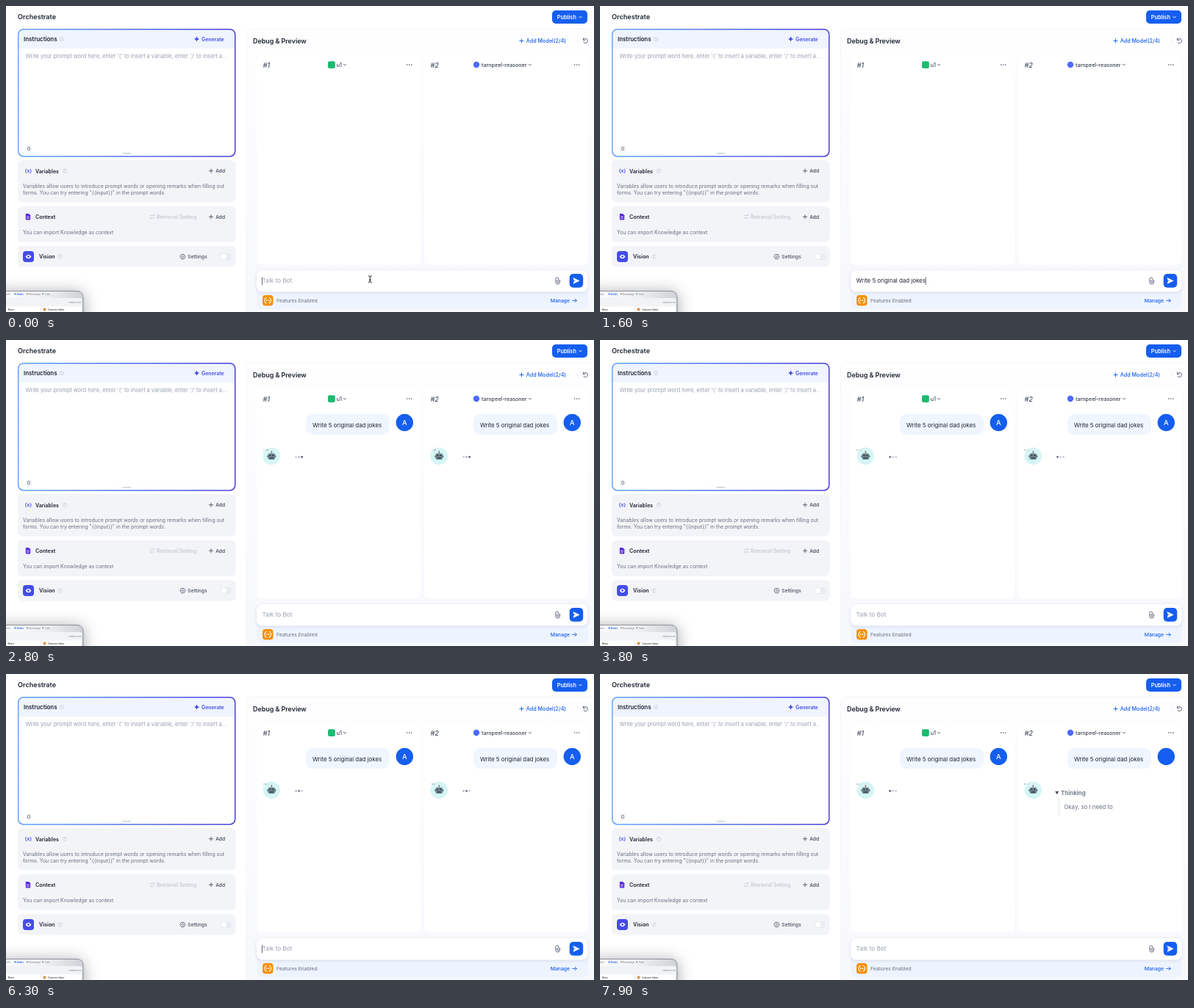
Animation, 800 px wide and 417 px high, one loop 8000 ms. Source, as an HTML page with a canvas:

```html
<!DOCTYPE html>
<html lang="en">
<head>
<meta charset="utf-8">
<title>Prompt debugging</title>
<style>
html, body { margin: 0; width: 100%; height: 100%; overflow: hidden; background: #fff; }
canvas { display: block; width: 800px; height: 417px; }
</style>
</head>
<body>
<canvas id="stage"></canvas>
<script>
const LOOP = 8000, W = 800, H = 417;
const PASTE = 1600, SEND = 1900, AVATAR = 2300, THINK = 7700;
const BLUE = '#155eef', INDIGO = '#444ce7', INK = '#1d2433', BODY = '#676f83', MUTED = '#98a0b0';
const PROMPT = 'Write 5 original dad jokes';
const COL = 228;

const canvas = document.getElementById('stage');
const c = canvas.getContext('2d');
const dpr = window.devicePixelRatio || 1;
canvas.width = W * dpr;
canvas.height = H * dpr;

function text(s, x, y, size, color, weight = 400, style = '') {
  c.font = `${style} ${weight} ${size}px Inter, "Liberation Sans", sans-serif`;
  c.fillStyle = color;
  c.fillText(s, x, y);
}

function box(x, y, w, h, r, fill, stroke, lw = 1) {
  c.beginPath();
  c.roundRect(x, y, w, h, r);
  if (fill) { c.fillStyle = fill; c.fill(); }
  if (stroke) { c.strokeStyle = stroke; c.lineWidth = lw; c.stroke(); }
}

function disc(x, y, r, fill) {
  c.beginPath();
  c.arc(x, y, r, 0, 7);
  c.fillStyle = fill;
  c.fill();
}

function ring(x, y, r, color, lw = 0.8, from = 0, to = Math.PI * 2) {
  c.beginPath();
  c.arc(x, y, r, from, to);
  c.strokeStyle = color;
  c.lineWidth = lw;
  c.stroke();
}

function path(d, x, y, stroke, lw = 1, fill) {
  const p = new Path2D(d);
  c.save();
  c.translate(x, y);
  c.lineCap = c.lineJoin = 'round';
  if (fill) { c.fillStyle = fill; c.fill(p); }
  if (stroke) { c.strokeStyle = stroke; c.lineWidth = lw; c.stroke(p); }
  c.restore();
}

function shadow(color, blur, dy = 0) {
  c.shadowColor = color;
  c.shadowBlur = blur * dpr;
  c.shadowOffsetY = dy * dpr;
}

const plus = (x, y, color) => path('M-2.6 0H2.6M0-2.6V2.6', x, y, color, 0.9);
const chevron = (x, y, color) => path('M-1.8-.9L0 .9L1.8-.9', x, y, color, 0.9);
const ellipsis = (x, y) => [-3, 0, 3].forEach(d => disc(x + d, y, 0.85, '#596175'));

function help(x, y) {
  ring(x, y, 2.7, '#c2c7d1', 0.6);
  text('?', x - 1.1, y + 1.5, 4, '#aeb4c0');
}

function vertical(y0, y1, a, b) {
  const g = c.createLinearGradient(0, y0, 0, y1);
  g.addColorStop(0, a);
  g.addColorStop(1, b);
  return g;
}

function drawInstructions() {
  const edge = c.createLinearGradient(16, 0, 312, 0);
  edge.addColorStop(0, '#63a5f8');
  edge.addColorStop(0.5, '#5272ee');
  edge.addColorStop(1, '#4a3fd4');
  box(16.7, 31.7, 295, 173.2, 7, '#fff');
  box(17, 32, 294.4, 26, [7, 7, 0, 0], '#eff4fe');
  box(16.7, 31.7, 295, 173.2, 7, null, edge, 1.5);
  text('Instructions', 24, 48, 7.9, INK, 600);
  help(76, 45);
  path('M0-3.6Q.6-.6 3.6 0Q.6.6 0 3.6Q-.6.6-3.6 0Q-.6-.6 0-3.6Z', 259.5, 45, null, 0, INDIGO);
  text('Generate', 266, 47.7, 6.9, INDIGO, 600);
  text("Write your prompt word here, enter '{' to insert a variable, enter '/' to insert a...",
    26.5, 71, 7.4, MUTED);
  box(27, 190, 8, 9.5, 2, '#f4f5f8');
  text('0', 28.8, 197.4, 6.8, BODY, 500);
  box(158.5, 200, 11.5, 1.6, 0.8, '#cdd1d9');
}

function drawCards() {
  for (const [y, h] of [[210, 57.5], [273, 49], [327, 28.5]]) box(16, y, 296.5, h, 6, '#f2f4f7');
  text('{x}', 25.4, 227.2, 6.6, INDIGO, 600);
  text('Variables', 40, 227.6, 7.1, INK, 600);
  help(80, 224.8);
  text('Variables allow users to introduce prompt words or opening remarks when filling out',
    23, 247.7, 6.9, BODY);
  text('forms. You can try entering "{{input}}" in the prompt words.', 23, 256.9, 6.9, BODY);

  path('M-3-4.2H1L3.2-2V3.2Q3.2 4.2 2.2 4.2H-2.2Q-3.2 4.2-3.2 3.2V-4.2Z', 30, 287.3, null, 0, '#5b2ee0');
  path('M-1.5 0H1.5M-1.5 2H1', 30, 287.3, '#fff', 0.7);
  text('Context', 40, 290, 7.2, INK, 600);
  path('M-3-1.6H2.6M1-3L2.6-1.6M-2.6 1.6H3M-1 3L-2.6 1.6', 199.3, 287.2, '#bfc4ce', 0.7);
  text('Retrieval Setting', 205, 289.7, 6.95, '#bfc4ce', 500);
  text('You can import Knowledge as context', 23, 311, 6.9, BODY);
  for (const y of [224.7, 287.2]) {
    plus(279, y, '#495164');
    text('Add', 285.2, y + 2.5, 6.6, '#394154', 500);
  }

  box(23, 334, 15, 15, 4, INDIGO);
  path('M-4 0Q0-5.6 4 0Q0 5.6-4 0Z', 30.5, 341.5, null, 0, '#fff');
  disc(30.5, 341.5, 1.4, INDIGO);
  text('Vision', 45, 344.1, 7.2, INK, 600);
  help(73.5, 341.5);
  path('M-1.7-3.1H1.7L3.5 0L1.7 3.1H-1.7L-3.5 0Z', 240.5, 341.6, '#5b6376', 0.9);
  ring(240.5, 341.6, 1.2, '#5b6376', 0.8);
  text('Settings', 247, 344.1, 6.8, '#495164', 500);
  box(292, 337, 14.5, 9, 3, '#e8ebf1');
  box(293, 338, 7, 7, 2.4, '#fff');
}

function drawThumbnail() {
  c.save();
  shadow('rgba(70,74,84,.5)', 22, 2);
  box(-20, 388.5, 125, 50, 8, '#f4f5f7');
  c.restore();
  const g = c.createLinearGradient(0, 0, 106, 0);
  g.addColorStop(0, '#fafafb');
  g.addColorStop(0.5, '#eef0f2');
  g.addColorStop(1, '#cfd1d6');
  box(-20, 388.5, 125, 50, 8, g, '#8d9098', 1);
  box(-20, 398, 123.5, 40, [0, 3, 0, 0], '#f2f3f6');
  text('Explore', -5, 393.6, 3, '#777');
  disc(12.4, 392.5, 1, BLUE);
  text('Studio', 14.5, 393.6, 3, BLUE, 600);
  disc(28.8, 392.5, 0.9, '#777');
  text('Knowledge', 30.8, 393.6, 3, '#777');
  disc(50.2, 392.5, 0.9, '#777');
  text('Tools', 52.2, 393.6, 3, '#777');
  text('Created by me', 85, 405, 2.5, '#70747d');
  box(-4, 409.5, 50, 12, 1.5, '#fff');
  box(48.5, 409.5, 54, 12, 1.5, '#fff');
  box(50.5, 411.5, 4, 4, 1, '#d79a55');
  text('Customer helper', 57, 415, 2.8, '#444', 600);
  text('Notes', 3, 415, 2.8, '#444', 600);
}

function drawFrame() {
  c.fillStyle = '#fff';
  c.fillRect(0, 0, W, H);
  text('Orchestrate', 16, 18.3, 9.1, INK, 600);
  box(743, 6, 48, 18, 5, BLUE);
  text('Publish', 749.7, 17.8, 7.35, '#fff', 600);
  chevron(781.5, 15.2, '#fff');

  drawInstructions();
  drawCards();
  drawThumbnail();

  box(327, 31, 490, 400, [7, 0, 0, 0], vertical(31, 417, '#fefeff', '#f7f8fc'), '#f3f4f8', 0.8);
  text('Debug & Preview', 336, 50.8, 8.9, INK, 600);
  plus(701.5, 47.5, BLUE);
  text('Add Model(2/4)', 707.7, 50.2, 7.2, BLUE, 500);
  box(777.6, 43.5, 0.6, 8, 0, '#e6e8ed');
  ring(788.3, 47.5, 3.1, '#596175', 0.9, -2.5, 2.7);
  path('M0 0V-2.6M0 0H2.6', 785.4, 46.5, '#596175', 0.9);
}

function drawBot(x, y) {
  disc(x, y, 11.7, '#d5f5f6');
  box(x - 0.5, y - 6, 1, 3, 0.5, '#6b7f86');
  disc(x, y - 6, 1, '#b0655f');
  box(x - 6, y - 1.4, 12, 3.2, 1.2, '#526970');
  box(x - 4.8, y - 3.8, 9.6, 8.6, 2, '#72888e');
  disc(x - 2, y - 1, 1.1, '#26363c');
  disc(x + 2, y - 1, 1.1, '#26363c');
  box(x - 2.8, y + 1.8, 5.6, 1.5, 0.4, '#33454c');
}

// Each dot fades out over half a second, rests, and fades back in; starts are staggered.
function dots(t, x, y, gap, r) {
  for (let i = 0; i < 3; i++) {
    const age = t - SEND - i * 500;
    const p = age < 0 ? 0 : (age % 2000) / 1000;
    const glow = Math.max(0, 1 - 2 * Math.min(p, 2 - p));
    disc(x + i * gap, y, r, `rgba(84,92,110,${0.3 + 0.7 * glow})`);
  }
}

function drawThought(t) {
  path('M-2.6-2H2.6L0 2.4Z', 621.7, 161.8, null, 0, '#475063');
  text('Thinking', 627, 165, 8, BODY, 600);
  box(623.6, 168.5, 1, 25, 0, '#dde0e7');
  const words = ['Okay,', 'so', 'I', 'need', 'to'];
  const shown = t < THINK + 100 ? 1 : t < THINK + 200 ? 3 : 5;
  text(words.slice(0, shown).join(' '), 631.3, 184, 7.85, BODY);
}

function drawColumn(i, name, t) {
  c.save();
  c.translate(i * COL, 0);
  box(341, 66, 223, 286, 6, '#fff');
  text('#' + (i + 1), 349.5, 83.6, 9.2, '#495164', 500, 'italic');
  ellipsis(548.7, 80);
  c.restore();

  if (i) disc(640, 80, 4.2, '#4d6bfe');
  else box(438, 75.2, 9.8, 9.8, 2.2, '#1dbb70');
  const x = i ? 647 : 449.7;
  text(name, x, 82.7, 7.1, '#394154', 500);
  chevron(x + c.measureText(name).width + 4.2, 80.2, '#596175');
  if (t < SEND) return;

  const thinking = i && t >= THINK;
  c.save();
  c.translate(i * COL, 0);
  box(408, 101, 114, 28, 9, '#eff6ff');
  text(PROMPT, 417, 119.2, 7.9, INK);
  disc(542.3, 112.5, 11.7, BLUE);
  if (t >= AVATAR && !thinking) {
    c.textAlign = 'center';
    text('A', 542.3, 116, 9.3, '#fff', 500);
    c.textAlign = 'left';
  }
  drawBot(361.3, 158.3);
  dots(t, 350, 150, 2.8, 0.7);
  if (!thinking) dots(t, 394.6, 159.4, 4, 1.4);
  c.restore();
  if (thinking) drawThought(t);
}

function caretOn(t) {
  if (t < PASTE) return (t + 100) % 1000 < 500;
  return t < SEND || (t + 900) % 1000 < 500;
}

function drawInput(t) {
  box(341, 380, 451, 33, 8, '#eef4ff');
  c.save();
  shadow('rgba(16,24,40,.12)', 5, 1);
  box(341, 360, 450.5, 29.5, 8, '#fff');
  c.restore();

  const typed = t >= PASTE && t < SEND;
  text(typed ? PROMPT : 'Talk to Bot', 348.6, 377.4, typed ? 7.9 : 8.2, typed ? INK : MUTED);
  const end = typed ? c.measureText(PROMPT).width + 0.5 : 0;
  if (caretOn(t)) box(348 + end, 369.5, 0.8, 10.5, 0, '#394154');

  path('M2.9-.8V1.7A2.9 2.9 0 0 1-2.9 1.7V-2.3A2 2 0 0 1 1.2-2.3V1.6A1 1 0 0 1-.9 1.6V-1.2',
    750.6, 374.5, '#596175', 0.9);
  box(766.7, 365, 18.5, 18.7, 5, BLUE);
  path('M-3.6-4L4.6 0L-3.6 4L-2.7.6L.6 0L-2.7-.6Z', 775.6, 374.4, '#fff', 0.4, '#fff');

  box(349, 394, 14.5, 14.5, 4, '#f79009');
  ring(356.2, 401.2, 4.3, '#fff', 1.2, 1.95, 4.3);
  ring(356.2, 401.2, 4.3, '#fff', 1.2, -1.2, 1.2);
  disc(354.8, 401.2, 0.9, '#fff');
  disc(357.6, 401.2, 0.9, '#fff');
  text('Features Enabled', 368, 403.8, 6.8, BODY);
  text('Manage', 740.8, 403.8, 6.8, BLUE, 500);
  path('M-2.8 0H2.8M.6-2.2L2.8 0L.6 2.2', 773.5, 401.4, BLUE, 0.9);
}

function drawPointer(t) {
  if (t >= PASTE) return;
  const p = Math.min(1, t / 1000), e = p * p * (3 - 2 * p);
  const x = 495.3 - 50.8 * e, y = 372.2 + 4.8 * e;
  const beam = 'M-2-4.4Q0-4.4 0-3V3Q0 4.4-2 4.4M2-4.4Q0-4.4 0-3M0 3Q0 4.4 2 4.4M-1 .9H1';
  path(beam, x, y, '#fff', 2);
  path(beam, x, y, '#111', 0.9);
}

function draw(now) {
  const t = now % LOOP;
  c.setTransform(dpr, 0, 0, dpr, 0, 0);
  drawFrame();
  drawColumn(0, 'u1', t);
  drawColumn(1, 'tarnpeel-reasoner', t);
  drawInput(t);
  drawPointer(t);
}

const start = performance.now();
function tick() {
  draw(performance.now() - start);
  requestAnimationFrame(tick);
}
tick();
</script>
</body>
</html>
```
